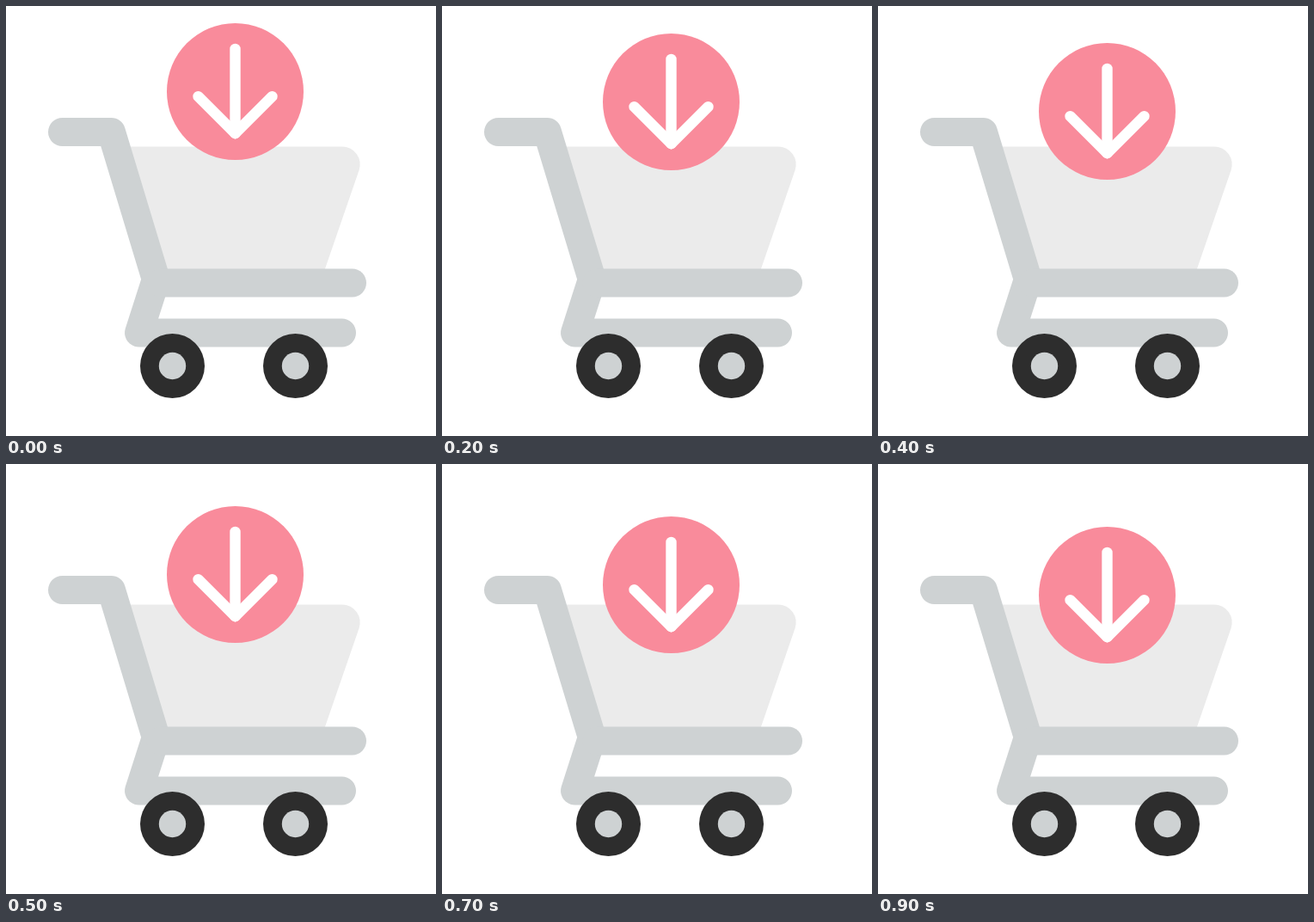
An HTML page with a canvas that plays this animation: 500x500 px, repeating every 1000 ms.

```html
<!DOCTYPE html>
<html lang="en">
<head>
<meta charset="utf-8">
<title>Add to cart</title>
<style>
  html, body { margin: 0; width: 100%; height: 100%; overflow: hidden; background: #fff; }
  canvas { display: block; width: 500px; height: 500px; }
</style>
</head>
<body>
<canvas id="stage" width="500" height="500"></canvas>
<script>
const ctx = document.getElementById('stage').getContext('2d');
const LOOP = 1000, STEP = 100, DROP = 5.85;
const FRAME = '#ced2d3', BASKET = '#ebebeb', BADGE = '#f98b9b', TYRE = '#2d2d2d';

function disc(x, y, r, color) {
  ctx.fillStyle = color;
  ctx.beginPath();
  ctx.arc(x, y, r, 0, Math.PI * 2);
  ctx.fill();
}

function stroke(points, width, color) {
  ctx.strokeStyle = color;
  ctx.lineWidth = width;
  ctx.lineCap = ctx.lineJoin = 'round';
  ctx.beginPath();
  points.forEach(([x, y]) => ctx.lineTo(x, y));
  ctx.stroke();
}

function basket() {
  ctx.fillStyle = BASKET;
  ctx.beginPath();
  ctx.moveTo(130, 163.5);
  ctx.arcTo(420, 163.5, 370.5, 307, 20.7);
  ctx.lineTo(370.5, 307);
  ctx.lineTo(174, 307);
  ctx.fill();
}

function cart() {
  stroke([[65.5, 146.5], [122.5, 146.5], [174.4, 318], [154.5, 380], [390.5, 380]], 33, FRAME);
  stroke([[180, 322], [402.5, 322]], 33, FRAME);
  for (const x of [193.5, 336.5]) {
    disc(x, 418.5, 37.5, TYRE);
    disc(x, 418.5, 15.7, FRAME);
  }
}

function badge(y) {
  ctx.save();
  ctx.translate(266.5, y);
  disc(0, 0, 79.5, BADGE);
  stroke([[0, -49.5], [0, 48.7]], 12.4, '#fff');
  stroke([[-43, 5.7], [0, 48.7], [43, 5.7]], 12.4, '#fff');
  ctx.restore();
}

function draw(now) {
  const step = Math.floor((now % LOOP) / STEP);
  ctx.clearRect(0, 0, 500, 500);
  basket();
  cart();
  badge(99.5 + Math.round(step * DROP));
}

let start;
function tick(now) {
  start ??= now;
  draw(now - start);
  requestAnimationFrame(tick);
}
draw(0);
requestAnimationFrame(tick);
</script>
</body>
</html>
```
